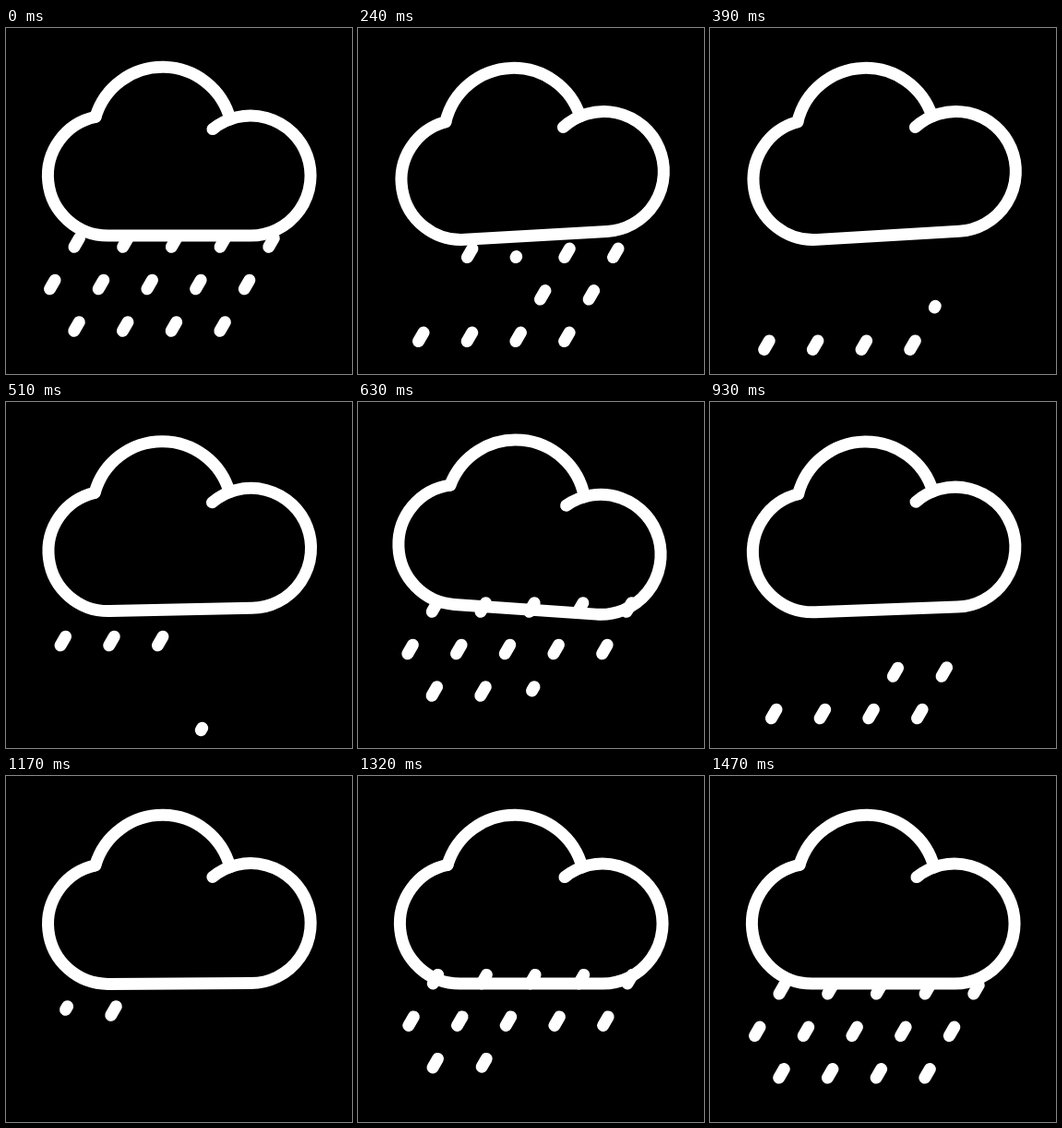
Write an HTML page that moves like this. It is 375 by 375 pixels and loops after 1.5 s.

```html
<!DOCTYPE html>
<html lang="en">
<head>
<meta charset="utf-8">
<title>Rain cloud</title>
<style>
html, body { margin: 0; width: 100%; height: 100%; overflow: hidden; background: #000; }
svg { display: block; width: 100%; height: 100%; }
g, path { fill: none; stroke: #fff; stroke-width: 13; stroke-linecap: round; stroke-linejoin: round; }
</style>
</head>
<body>
<svg viewBox="0 0 375 375">
  <g id="rain"></g>
  <g id="cloud">
    <path d="M97 96.4A65 65 0 0 0 110.5 225H265A65 65 0 1 0 224 109.6"/>
    <path d="M97 96.4A75.8 75.8 0 0 1 243 99"/>
  </g>
</svg>
<script>
const LOOP = 1500, STEP = 30;
const rain = document.getElementById('rain');
const cloud = document.getElementById('cloud');

// [time, degrees]
const tilt = [[0, 0], [300, -3.8], [510, -1.2], [645, 4.1], [930, -2.1], [1170, -0.3], [1500, 0]];

// Two showers; drift is [time, dx, dy]
const showers = [
  { enter: -340, leave: 121,
    drift: [[-370, 15.5, -27], [-330, 13.5, -23.5], [-30, 1, -1.2], [0, 0, 0], [240, -8.2, 11.3], [520, -21, 28]] },
  { enter: 456, leave: 715,
    drift: [[429, 14.5, -25.5], [510, 11.5, -19], [630, 6.3, -10], [930, -7.3, 14.5], [1112, -15.5, 29]] }
];

// Rows of drops: left x, y, order of appearing and of vanishing
const rows = [
  { x: 76.7, y: 232.5, come: [3, 3.5, 4, 4.5, 5], go: [3, 5, 4, 6, 7] },
  { x: 50.3, y: 278, come: [1, 0, 2, 3, 4], go: [0, 1, 2, 8, 9] },
  { x: 76.5, y: 323.5, come: [5, 6, 7, 8], go: [10, 11, 12, 13] }
];
const GAP = 52.7, COME = 27, GO = 30.5;
const HALF = { x: -2.75, y: 4.75 };

const clamp = v => Math.max(0, Math.min(1, v));

function span(keys, t) {
  let i = 0;
  while (i < keys.length - 2 && t >= keys[i + 1][0]) i++;
  return [i, (t - keys[i][0]) / (keys[i + 1][0] - keys[i][0])];
}

function linear(keys, t, col) {
  const [i, u] = span(keys, t);
  return keys[i][col] + (keys[i + 1][col] - keys[i][col]) * u;
}

function smooth(keys, t) {
  const [i, u] = span(keys, t);
  const slope = k => k === 0 || k === keys.length - 1 ? 0 :
    (keys[k + 1][1] - keys[k - 1][1]) / (keys[k + 1][0] - keys[k - 1][0]);
  const d = keys[i + 1][0] - keys[i][0], v = 1 - u;
  return keys[i][1] * (1 + 2 * u) * v * v + slope(i) * d * u * v * v +
    keys[i + 1][1] * u * u * (3 - 2 * u) - slope(i + 1) * d * u * u * v;
}

const drops = showers.flatMap(shower => rows.flatMap(row => row.come.map((come, i) => {
  const el = document.createElementNS('http://www.w3.org/2000/svg', 'path');
  rain.append(el);
  return {
    el, shower, x: row.x + GAP * i, y: row.y,
    come: shower.enter + COME * come,
    go: shower.leave + GO * row.go[i]
  };
})));

function drawDrop(d, t) {
  const head = clamp((t - d.come + COME) / COME);
  const tail = clamp((t - d.go + GO) / GO);
  if (head <= tail) return d.el.setAttribute('d', '');
  const x = d.x + linear(d.shower.drift, t, 1);
  const y = d.y + linear(d.shower.drift, t, 2);
  const at = p => `${x + HALF.x * (2 * p - 1)} ${y + HALF.y * (2 * p - 1)}`;
  d.el.setAttribute('d', `M${at(tail)}L${at(head)}`);
}

function draw(t) {
  cloud.setAttribute('transform', `rotate(${smooth(tilt, t)} 188 135)`);
  for (const d of drops) {
    const wraps = d.shower.enter < 0 && t > LOOP / 2;
    drawDrop(d, wraps ? t - LOOP : t);
  }
}

const start = performance.now();
function frame(now) {
  const t = Math.max(0, now - start) % LOOP;
  draw(Math.floor(t / STEP) * STEP);
  requestAnimationFrame(frame);
}
draw(0);
requestAnimationFrame(frame);
</script>
</body>
</html>
```
